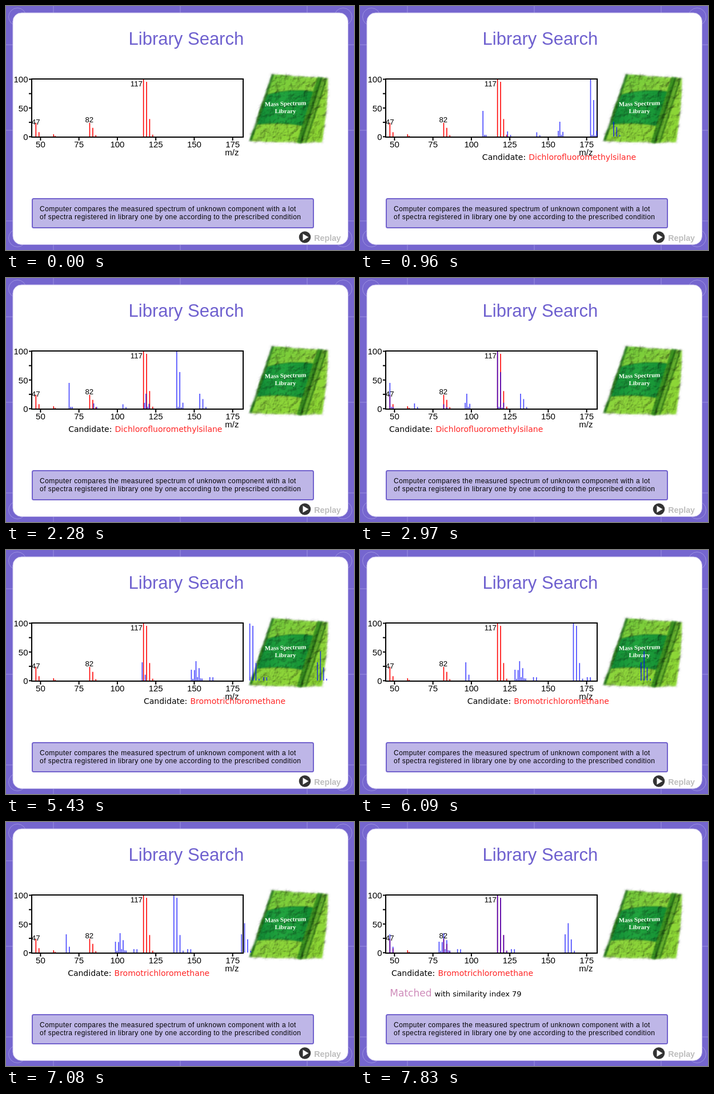
An HTML page for the animation above (8 s loop, 609 by 428 pixels).

```html
<!DOCTYPE html>
<html lang="en">
<head>
<meta charset="utf-8">
<title>Library Search</title>
<style>
  html, body { margin: 0; width: 100%; height: 100%; overflow: hidden; background: #7566cf; }
  svg { display: block; width: 609px; height: 428px; }
  text { white-space: pre; }
  .sans { font-family: "Liberation Sans", Arial, sans-serif; }
  .wide { font-family: "DejaVu Sans", Verdana, sans-serif; }
  .serif { font-family: "Liberation Serif", "Times New Roman", serif; font-weight: bold; }
</style>
</head>
<body>
<svg viewBox="0 0 609 428">
  <defs>
    <linearGradient id="leaf" x1="0" y1="0" x2="1" y2="1">
      <stop offset="0" stop-color="#62c238"/>
      <stop offset=".5" stop-color="#8ed63c"/>
      <stop offset="1" stop-color="#8bd630"/>
    </linearGradient>
    <linearGradient id="band" x1="0" y1="0" x2="1" y2="0">
      <stop offset="0" stop-color="#0f8a34"/>
      <stop offset=".45" stop-color="#22a53f"/>
      <stop offset="1" stop-color="#0f8a30"/>
    </linearGradient>
    <filter id="rough" x="-10%" y="-10%" width="120%" height="120%" color-interpolation-filters="sRGB">
      <feTurbulence type="fractalNoise" baseFrequency=".08" numOctaves="3" seed="4" result="noise"/>
      <feDiffuseLighting in="noise" surfaceScale="2.5" diffuseConstant="1.1" lighting-color="#fff" result="light">
        <feDistantLight azimuth="225" elevation="60"/>
      </feDiffuseLighting>
      <feGaussianBlur in="SourceGraphic" stdDeviation=".8" result="soft"/>
      <feBlend in="light" in2="soft" mode="multiply" result="lit"/>
      <feDisplacementMap in="SourceAlpha" in2="noise" scale="8" xChannelSelector="R" yChannelSelector="G"/>
      <feGaussianBlur stdDeviation="2.2" result="edge"/>
      <feComposite in="lit" in2="edge" operator="in"/>
    </filter>
  </defs>

  <rect width="609" height="428" fill="#7566cf"/>
  <g id="trim" fill="none" stroke="#9b90e0"/>
  <rect x="12" y="12" width="586.5" height="406.5" rx="15" fill="#fff" stroke="#c9c2ec"/>
  <text class="sans" x="214.6" y="67.5" font-size="31" fill="#6f61cf">Library Search</text>

  <g filter="url(#rough)" fill="none">
    <path d="M466 119 L565 126 L562 180 L554 240 L518 241 L425 238 Z" fill="url(#leaf)"/>
    <path d="M453 157 Q498 143 543 151 L526 211 Q479 202 436 208 Z" fill="url(#band)" stroke="#0d6a22"/>
    <path d="M467 119 L427 238" stroke="#2a7a1c" stroke-width="5"/>
    <path d="M549 124 L512 241" stroke="#3c9420" stroke-width="7"/>
    <path d="M553 124 L516 241" stroke="#1f6414" stroke-width="3"/>
    <path d="M557 125 L520 241" stroke="#62ad2c" stroke-width="4"/>
    <path d="M561 126 L524 241" stroke="#2d7517" stroke-width="2.5"/>
  </g>
  <g class="serif" font-size="10.9" fill="#f2fff0">
    <text x="453" y="176" transform="rotate(-2 453 176)">Mass Spectrum</text>
    <text x="470.5" y="187.5">Library</text>
  </g>

  <g id="axes" class="sans" font-size="15">
    <rect x="45" y="128" width="370" height="102" fill="none" stroke="#000" stroke-width="2"/>
    <text x="383.3" y="262">m/z</text>
  </g>
  <g id="measured" stroke="#f00" stroke-width="1.6"/>
  <g id="slides" class="wide"/>
  <g class="sans" font-size="13.2">
    <text x="217.8" y="141">117</text>
    <text x="138.5" y="204">82</text>
    <text x="44.8" y="208">47</text>
  </g>

  <rect x="46" y="338" width="492" height="51" rx="2.5" fill="#beb6e7" stroke="#7262cd" stroke-width="2"/>
  <g class="sans" font-size="12" letter-spacing=".46">
    <text x="59" y="360">Computer compares the measured spectrum of unknown component with a lot</text>
    <text x="59" y="374">of spectra registered in library one by one according to the prescribed condition</text>
  </g>

  <circle cx="523" cy="405.5" r="10.3" fill="#333"/>
  <path d="M519.5 399.5 L529.5 405.5 L519.5 411.5 Z" fill="#fff"/>
  <text class="sans" x="539.2" y="411.5" font-size="14.3" font-weight="bold" fill="#bdbdbd">Replay</text>
</svg>

<script>
const LOOP = 8000, GRID = 30, STEPS = 49, STEP = 2340 / STEPS, BASE = 229;
const $ = id => document.getElementById(id);
const massX = mass => 60.4 + (mass - 50) * 2.69;

function add(parent, tag, attrs, text) {
  const el = document.createElementNS("http://www.w3.org/2000/svg", tag);
  for (const key in attrs) el.setAttribute(key, attrs[key]);
  if (text !== undefined) el.textContent = text;
  parent.appendChild(el);
  return el;
}

const line = (parent, x1, y1, x2, y2, extra) => add(parent, "line", { x1, y1, x2, y2, ...extra });

// Relative abundance of the heavier isotope, two mass units up
const HEAVY = { Cl: 0.32, Br: 0.97 };

// Heights of the isotope peaks of an ion with the given halogens
function isotopes(halogens) {
  return halogens.reduce((pattern, atom) =>
    [...pattern, 0].map((h, i) => h + HEAVY[atom] * (pattern[i - 1] || 0)), [1]);
}

// Each ion is [mass, height in percent, halogens, charge]
function drawSpectrum(parent, ions) {
  for (const [mass, height, halogens = "", charge = 1] of ions) {
    isotopes(halogens.match(/Cl|Br/g) || []).forEach((part, i) => {
      const x = massX(mass + 2 * i / charge), h = height * part;
      if (h > 1.2) line(parent, x, BASE - h, x, BASE);
    });
  }
}

// Faint ornament in the border
[83, 305, 527].forEach(x => line($("trim"), x, 0, x, 428));
[68, 218, 377].forEach(y => line($("trim"), 0, y, 609, y));
for (const cx of [20, 590])
  for (const cy of [19, 407]) add($("trim"), "circle", { cx, cy, r: 15.5 });

const tick = { stroke: "#000", "stroke-width": 2 };
for (let i = 0; i <= 4; i++) {
  const y = 128.5 + i * 25.2;
  line($("axes"), 40, y, 45, y, tick);
  if (i % 2 === 0) add($("axes"), "text", { x: 38.5, y: y + 5.7, "text-anchor": "end" }, 100 - i * 25);
}
for (let mass = 50; mass <= 175; mass += 25) {
  const x = massX(mass);
  line($("axes"), x, 230, x, 236, tick);
  add($("axes"), "text", { x, y: 248, "text-anchor": "middle" }, mass);
}

drawSpectrum($("measured"), [
  [47, 24, "Cl"], [58.5, 4, "Cl", 2], [82, 24, "ClCl"], [117, 100, "ClClCl"]
]);

const candidates = [
  {
    name: "Dichlorofluoromethylsilane", index: 47, x: 51, noteY: 307,
    start: 630, phase: 0.32, shift: 190, noteAt: 4230, end: 5430,
    ions: [
      [47, 45], [48, 3], [49, 3], [63, 9, "Cl"], [82, 7.5, "Cl"], [96, 10, "Cl"],
      [97, 26, "Cl"], [117, 100, "ClCl"], [118, 3, "ClCl"], [132, 26, "ClCl"]
    ]
  },
  {
    name: "Bromotrichloromethane", index: 79, x: 55, noteY: 306,
    start: 5430, phase: 0.47, shift: 186, noteAt: 7830, end: LOOP,
    ions: [
      [47, 32, "Cl"], [79, 19, "Br"], [80, 3], [82, 34, "ClCl"], [83, 6, "ClCl"],
      [91, 6, "Br"], [117, 100, "ClClCl"], [126, 6, "Br"], [161, 32, "ClClBr"]
    ]
  }
];

for (const c of candidates) {
  c.group = add($("slides"), "g", {});
  c.slide = add(c.group, "g", { "font-size": 14 });
  drawSpectrum(add(c.slide, "g", { stroke: "#00f", "stroke-opacity": 0.7, "stroke-width": 1.7 }), c.ions);
  add(c.slide, "text", { x: c.x, y: 270 }, "Candidate:");
  add(c.slide, "text", { x: c.x + 81.4, y: 270, fill: "#ff2626" }, c.name);
  c.note = add(c.group, "g", {});
  add(c.note, "text", { x: 52.3, y: c.noteY, "font-size": 17, fill: "#cf8cba" }, "Matched");
  add(c.note, "text", { x: 130.5, y: c.noteY, "font-size": 13 }, "with similarity index " + c.index);
}

const show = (el, on) => el.setAttribute("display", on ? "inline" : "none");

function render(time) {
  const t = Math.floor((time % LOOP) / GRID) * GRID;
  for (const c of candidates) {
    const step = Math.floor((t - c.start) / STEP + c.phase);
    const done = Math.max(0, Math.min(1, step / STEPS));
    show(c.group, t >= c.start && t < c.end);
    show(c.note, t >= c.noteAt);
    c.slide.setAttribute("transform", `translate(${(c.shift * (1 - done)).toFixed(2)} 0)`);
  }
}

let origin;
function tickFrame(now) {
  origin ??= now;
  render(now - origin);
  requestAnimationFrame(tickFrame);
}
render(0);
requestAnimationFrame(tickFrame);
</script>
</body>
</html>
```
